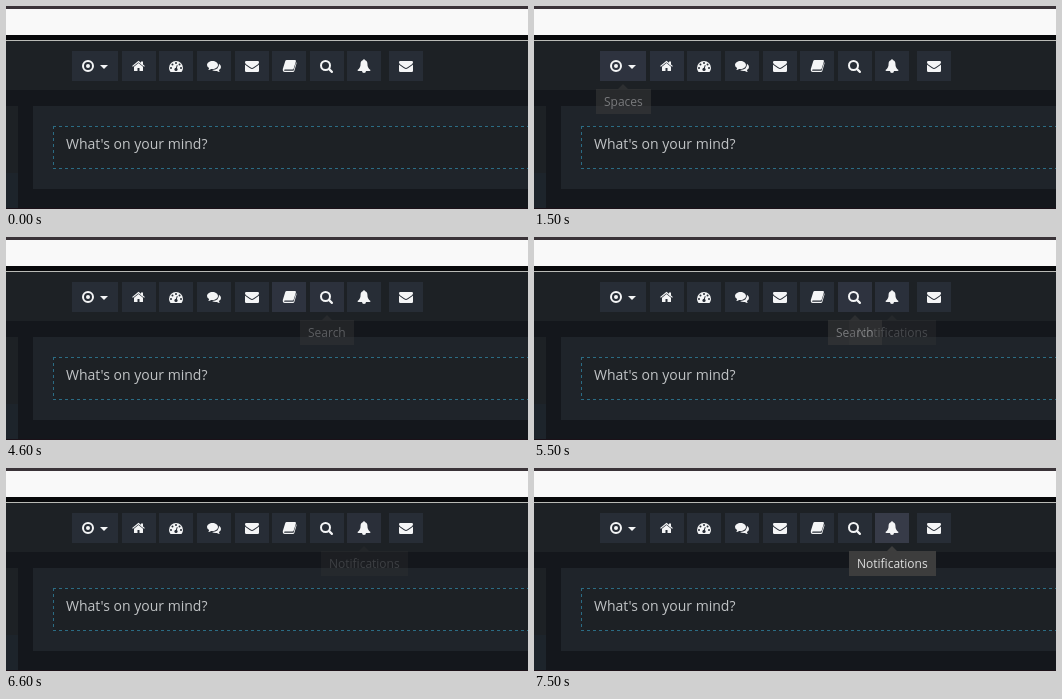
Write an HTML page that moves like this. It is 522 px wide and 203 px high and loops after 8000 ms.

```html
<!DOCTYPE html>
<html lang="en">
<head>
<meta charset="utf-8">
<title>Menu tooltips</title>
<style>
  html, body { margin: 0; width: 100%; height: 100%; overflow: hidden; background: #14171c; }
  #stage { position: relative; width: 522px; height: 203px; overflow: hidden; font-family: "Open Sans", sans-serif; }
  #stage > * { position: absolute; box-sizing: border-box; }
  .frame { left: 0; top: 0; width: 522px; height: 35px;
    background: linear-gradient(#3a3338 3px, #f9f9f9 3px 29px, #08090b 29px 34px, #b9bab6 34px); }
  .nav { left: 0; top: 35px; width: 522px; height: 49px; background: #1d2125; }
  .side { left: 0; top: 100px; width: 12px; height: 103px; background: linear-gradient(#1d2125 67px, #1d242b 67px); }
  .panel { left: 27px; top: 100px; width: 495px; height: 83px; background: #1f242a; }
  .field { left: 47px; top: 120px; width: 475px; height: 43px; background: #1d2125;
    color: #c0c3c5; font-size: 14px; line-height: 20px; padding: 8px 13px; white-space: nowrap; }
  .edge { left: 0; top: 202px; width: 522px; height: 1px; background: #1b1118; }
  .button { top: 45px; height: 30px; background: #272d36; }
  .hover { position: absolute; inset: 0; background: #373b48; opacity: 0; }
  svg { left: 0; top: 0; }
  .line { fill: none; stroke: #f4f5f6; }
  .cut { fill: #272d36; stroke: #272d36; stroke-width: 0; }
  .tip { top: 83px; height: 25px; padding: 0 8px; background: #3d3d3d; color: #dedede; opacity: 0;
    font-size: 12px; line-height: 25px; white-space: nowrap; }
  .tip::before { content: ""; position: absolute; left: 50%; top: -5px; margin-left: -5px;
    border: 5px solid transparent; border-top: 0; border-bottom-color: #3d3d3d; }
</style>
</head>
<body>
<div id="stage">
  <div class="frame"></div>
  <div class="nav"></div>
  <div class="side"></div>
  <div class="panel"></div>
  <div class="field">What's on your mind?</div>
  <div class="edge"></div>
  <svg id="icons" width="522" height="203" fill="#f4f5f6">
    <defs>
      <g id="mail">
        <path d="M-7-3.75Q-7-5-5.75-5H5.75Q7-5 7-3.75C7-2.7 6.2-2 5.7-1.6L2 .9Q.6 2 0 2T-2 .9L-5.7-1.6C-6.2-2-7-2.7-7-3.75Z"/>
        <path d="M-7-1.45L-6.2-.8L-2.3 1.9Q-.8 3 0 3T2.3 1.9L6.2-.8L7-1.45V4.75Q7 6 5.75 6H-5.75Q-7 6-7 4.75Z"/>
      </g>
    </defs>
    <path class="line" d="M47 120.5H522M47 162.5H522M47.5 120V163" style="stroke: #2b6c84" stroke-dasharray="3"/>
    <g transform="translate(82 60)">
      <circle class="line" r="5" stroke-width="2"/><circle r="2"/>
    </g>
    <path d="M94 59H102L98 63Z"/>
    <g transform="translate(132.5 60)">
      <path d="M0-3L4.5.75V4.5Q4.5 5 4 5H1V2H-1V5H-4Q-4.5 5-4.5 4.5V.75ZM2.5-4.5H4.5V-.5L2.5-2Z"/>
      <path class="line" d="M-6 .4L0-4.5L6 .4" stroke-width="1.2"/>
    </g>
    <g transform="translate(170 60)">
      <path d="M-5.5 6Q-7 4-7 2A7 7 0 0 1 7 2Q7 4 5.5 6Z"/>
      <g id="dial" class="cut">
        <circle cy="3.4" r="1.6"/><path d="M0 3.4L1.2-.8" stroke-width="1"/>
      </g>
    </g>
    <g transform="translate(208 60)">
      <path d="M-1.5-5C1.5-5 4-3.2 4-1S1.5 3-1.5 3L-2.9 2.9Q-4 3.8-5.7 4Q-5.1 3-4.9 2.1Q-7 .8-7-1C-7-3.2-4.5-5-1.5-5Z"/>
      <path d="M5-2.2Q7-.9 7 1Q7 2.8 4.9 4.1Q5.1 5 5.8 6Q4.2 5.8 2.9 4.9Q.2 5.3-2 4.1Q5.2 4 5-2.2Z"/>
    </g>
    <use href="#mail" x="246" y="60"/>
    <g transform="translate(283.5 60)">
      <path d="M-2.8-6H5.3Q6.8-6 6.4-4.6L4.2 2.6Q3.9 3.6 2.9 3.6H-5L-5.4 4.8H4L6.8-4L7-2.6L4.8 5Q4.5 6 3.5 6H-4.8Q-7 6-6.7 3L-4.2-5Q-3.9-6-2.8-6Z"/>
      <path class="cut" d="M-1.7-3H3.6M-2.4-.7H2.9" stroke-width="1"/>
    </g>
    <g class="line" transform="translate(319.5 59.5)">
      <circle r="4.5" stroke-width="2"/>
      <path d="M3.4 3.4L6.4 6.4" stroke-width="2.2" stroke-linecap="round"/>
    </g>
    <path transform="translate(358 60)" d="M0-7Q.75-7 .7-6C2.4-5.7 3.4-4.2 3.4-2.5C3.4 1.2 4.5 2.6 6.5 4Q6.5 5 5.5 5H2A2 2 0 0 1-2 5H-5.5Q-6.5 5-6.5 4C-4.5 2.6-3.4 1.2-3.4-2.5C-3.4-4.2-2.4-5.7-.7-6Q-.75-7 0-7Z"/>
    <use href="#mail" x="400" y="60"/>
  </svg>
</div>
<script>
const LOOP = 8000, TICK = 100, FADE = 200;
const stage = document.getElementById("stage");
const icons = document.getElementById("icons");

// The pointer passes along the menu; a visit is [enter, fully left] in ms.
const buttons = [
  { tip: "Spaces", visits: [[700, 1600]] },
  { visits: [[1450, 2300]] },
  { visits: [[2200, 3000]] },
  { visits: [[2800, 3700]] },
  { visits: [[3600, 4300]] },
  { visits: [[4100, 4700]] },
  { tip: "Search", visits: [[4530, 5600]] },
  { tip: "Notifications", visits: [[5450, 6640], [7300, LOOP + FADE]] },
  { visits: [] }
];

const clamp = x => Math.max(0, Math.min(1, x));

function levelAt(time, visits) {
  return Math.max(0, ...visits.map(([enter, left]) =>
    clamp(Math.min(time - enter, left - time) / FADE)));
}

function fade(element, visits) {
  const frames = Array.from({ length: LOOP / TICK + 1 }, (_, i) =>
    ({ opacity: levelAt(i * TICK, visits), easing: "step-end" }));
  element.animate(frames, { duration: LOOP, iterations: Infinity });
}

function addBox(className, parent, before = null) {
  const box = document.createElement("div");
  box.className = className;
  return parent.insertBefore(box, before);
}

function addTip(label, center, visits) {
  const tip = addBox("tip", stage);
  tip.textContent = label;
  tip.style.left = Math.round(center - tip.offsetWidth / 2) + "px";
  fade(tip, visits);
}

buttons.forEach(({ tip, visits }, i) => {
  const isFirst = i === 0, isLast = i === buttons.length - 1;
  const left = isFirst ? 66 : isLast ? 383 : Math.round(115.9 + 37.55 * (i - 1));
  const width = isFirst ? 46 : 34;
  const button = addBox("button", stage, icons);
  button.style.left = left + "px";
  button.style.width = width + "px";
  fade(addBox("hover", button), visits);
  if (tip) addTip(tip, left + width / 2, visits);
});

// Marks of the gauge sit every 45 degrees around its centre.
const dial = document.getElementById("dial");
for (let i = 0; i <= 4; i++) {
  const mark = document.createElementNS("http://www.w3.org/2000/svg", "circle");
  const angle = i * Math.PI / 4;
  mark.setAttribute("cx", -5 * Math.cos(angle));
  mark.setAttribute("cy", 2 - 5 * Math.sin(angle));
  mark.setAttribute("r", 1);
  dial.append(mark);
}
</script>
</body>
</html>
```
